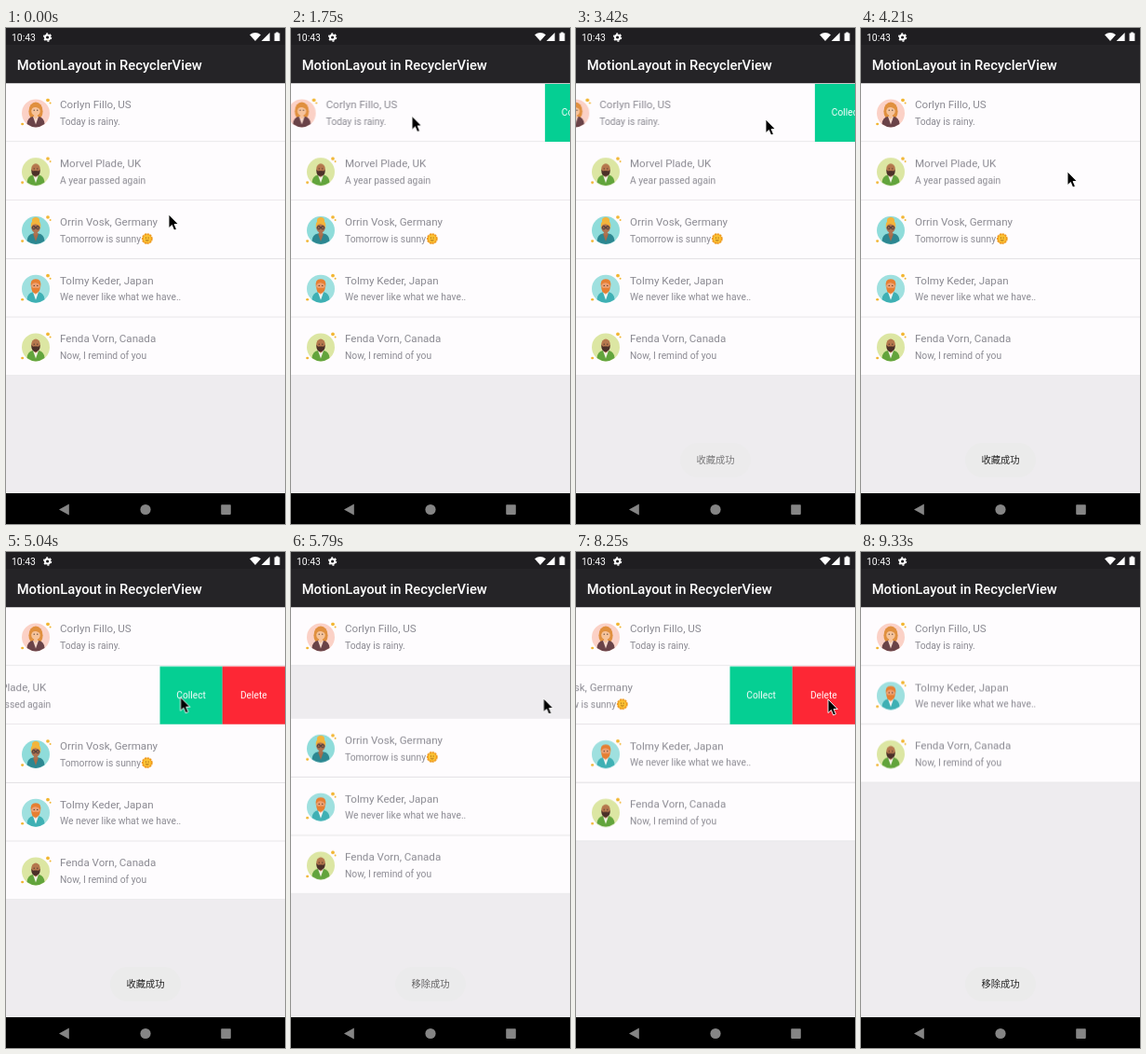
An HTML page that plays this animation: 300x532 px, repeating every 9.37 s.

```html
<!DOCTYPE html>
<html lang="en">
<head>
<meta charset="utf-8">
<title>Swipe list</title>
<style>
  html, body { margin: 0; width: 100%; height: 100%; overflow: hidden; background: #eeecef; }
  svg { display: block; width: 300px; height: 532px; font-family: Roboto, "Noto Sans", sans-serif; }
  .name { font-size: 11.6px; fill: #8b8a92; }
  .note { font-size: 10.3px; fill: #8b8a92; }
  .label { font-size: 10.2px; fill: #fff; text-anchor: middle; }
  .toast text { font: 10.25px "Noto Sans CJK SC", "Noto Sans CJK", sans-serif; fill: #222; text-anchor: middle; }
</style>
</head>
<body>
<svg viewBox="0 0 300 532">
  <rect width="300" height="532" fill="#eeecef"/>
  <g id="list"></g>
  <g id="toasts"></g>

  <rect width="300" height="59.2" fill="#252427"/>
  <rect width="300" height="18" fill="#1f1e21"/>
  <text x="6" y="13.6" font-size="10.4" fill="#fff">10:43</text>
  <g fill="none" stroke="#fff">
    <circle cx="44.6" cy="10" r="2.6" stroke-width="2"/>
    <circle cx="44.6" cy="10" r="4" stroke-width="1.3" stroke-dasharray="2.1"/>
  </g>
  <g fill="#fff">
    <path d="M262 7.2Q268 2.6 274 7.2L268 14Z"/>
    <path d="M283.6 5V14H274.6Z"/>
    <path d="M288.6 5.6H290.2V4.5H292.8V5.6H294.4V14H288.6Z"/>
  </g>
  <text x="11.7" y="45" font-size="14.75" font-weight="500" fill="#fff">MotionLayout in RecyclerView</text>

  <rect y="499" width="300" height="33" fill="#000"/>
  <g fill="#858585">
    <path d="M57 516.5L67.8 510.6V522.4Z"/>
    <circle cx="150" cy="516.5" r="5.6"/>
    <rect x="231.2" y="511.3" width="10.6" height="10.6" rx=".8"/>
  </g>

  <path id="cursor" d="M0 0V14.6L3.4 11.5L5.7 17L8.4 15.8L6.1 10.5H10.3Z" fill="#000" stroke="#fff" stroke-width=".9"/>
</svg>

<script>
const LOOP = 9370;
const TOP = 59.4, PITCH = 62.75;
const SWIPE = 102, BUTTONS = 134.5;
const DRAG = 280;
const SINE = 'cubic-bezier(.37,0,.63,1)';
const STANDARD = 'cubic-bezier(.4,0,.2,1)';

const $ = id => document.getElementById(id);
const oval = (x, y, rx, ry, fill, more = '') =>
  `<ellipse cx="${x}" cy="${y}" rx="${rx}" ry="${ry}" fill="${fill}" ${more}/>`;
const shape = (d, fill) => `<path d="${d}" fill="${fill}"/>`;
const fringe = fill => shape('M-5.2-2Q-6.5-10.4 0-10.4T5.2-2Q4-6 0-6.4T-5.2-2Z', fill);

// Parts drawn behind and in front of the shared head and shoulders.
const people = [
  { name: 'Corlyn Fillo, US', note: 'Today is rainy.',
    bg: '#fbd1c6', skin: '#f6c39b', top: '#6a4348', shirt: '#f6d9cc',
    back: oval(0, -2, 7.6, 10, '#e0903f'), front: fringe('#e0903f') },
  { name: 'Morvel Plade, UK', note: 'A year passed again', beard: '#4b3028',
    bg: '#dce6a3', skin: '#b5774d', top: '#62a43c', shirt: '#f4f2e6' },
  { name: 'Orrin Vosk, Germany', note: 'Tomorrow is sunny', sunny: true,
    bg: '#8fdcda', skin: '#b07350', top: '#2c8791', shirt: '#a96d4a',
    back: oval(0, -10.5, 4, 3.6, '#f3b53c'),
    front: fringe('#f3b53c') + [-2.1, 2.1].map(x =>
      oval(x, -2.8, 1.7, 1.7, 'none', 'stroke="#343039" stroke-width=".8"')).join('') },
  { name: 'Tolmy Keder, Japan', note: 'We never like what we have..', beard: '#e67f32',
    bg: '#9fe0df', skin: '#eda173', top: '#3fb0b4', shirt: '#f1f4f2', front: fringe('#e67f32') },
  { name: 'Fenda Vorn, Canada', note: 'Now, I remind of you', beard: '#4b3028',
    bg: '#dce6a3', skin: '#b5774d', top: '#62a43c', shirt: '#f4f2e6' }
];

const avatar = ({ bg, skin, top, shirt, beard, back = '', front = '' }) => `
  <g transform="translate(32 32)">
    ${oval(0, 0, 15, 15, bg)}${back}
    ${shape('M-9.5 11.6Q-9 4.5-3 3.6H3Q9 4.5 9.5 11.6Q0 18.4-9.5 11.6Z', top)}
    ${shape('M-3 3.6H3L0 12Z', shirt)}
    ${oval(0, 3, 1.9, 2.8, skin)}${oval(0, -3, 4.8, 5.8, skin)}
    ${beard ? shape('M-4.7-2.6Q-3 0-1.8-.9H1.8Q3 0 4.7-2.6Q5 4.6 0 4.8T-4.7-2.6Z', beard) : ''}
    ${front}${oval(-1.8, -3.2, .6, .6, '#3a2a28')}${oval(1.8, -3.2, .6, .6, '#3a2a28')}
    ${oval(13, -14, 1.9, 1.8, '#f2b632')}${oval(15.6, -11, 1, 1, '#f2b632')}
    ${oval(-14.4, 11.6, 1.5, 1.3, '#f2b632')}
  </g>`;

const sun = `<g transform="translate(151.8 41.1)">
  ${oval(0, 0, 4.9, 4.9, '#f5a11d', 'stroke="#f09a1a" stroke-width="2" stroke-dasharray="2.2 .6"')}
  ${oval(0, 0, 4, 4, '#fcc435')}
  <path d="M-1.3-1.6V-.3M1.3-1.6V-.3M-1.6 1.4Q0 2.6 1.6 1.4" fill="none" stroke="#8a4d12" stroke-width=".8"/>
</g>`;

const button = (x, fill, text) =>
  `<rect x="${x}" y=".6" width="67.3" height="${PITCH - .6}" fill="${fill}"/>
   <text class="label" x="${x + 33.6}" y="35.1">${text}</text>`;

$('list').innerHTML = people.map((p, i) => `
  <g transform="translate(0 ${TOP + i * PITCH})"><g id="row${i}">
    <rect width="300" height="${PITCH}" fill="#dfdee1"/>
    <rect width="300" height="62" fill="#fefcfe"/>
    <g id="face${i}">
      ${avatar(p)}
      <text class="name" x="58" y="27">${p.name}</text>
      <text class="note" x="58" y="44.6">${p.note}</text>${p.sunny ? sun : ''}
    </g>
    <g id="buttons${i}" style="transform:translate(${BUTTONS}px,0)">
      ${button(165.5, '#05cf93', 'Collect')}${button(232.7, '#fd2735', 'Delete')}
    </g>
  </g></g>`).join('');

const begin = document.timeline.currentTime || 0;

// Each step is [ms, value, easing to the next step].
function track(id, prop, steps, css = v => v) {
  const inside = steps.filter(([t]) => t > 0 && t < LOOP);
  const all = [[0, steps[0][1]], ...inside, [LOOP, inside[inside.length - 1][1]]];
  const frames = all.map(([t, v, easing = 'linear']) => ({ offset: t / LOOP, [prop]: css(v), easing }));
  $(id).animate(frames, { duration: LOOP, iterations: Infinity }).startTime = begin;
}

const move = ([x, y]) => `translate(${x}px, ${y}px)`;

let hand = [175, 200];
const path = [[0, hand]];
const lifts = people.map(() => []);

function glide(t, ms, x, y, easing = SINE) {
  path.push([t, hand, easing], [t + ms, hand = [x, y]]);
}

// The buttons follow the hand; the row content moves a little less.
function swipe(i, t, closing = []) {
  glide(t, DRAG, hand[0] - BUTTONS, hand[1], 'linear');
  const steps = [[t, 0], [t + DRAG, 1], ...closing];
  track('face' + i, 'transform', steps, p => move([-SWIPE * p, 0]));
  track('buttons' + i, 'transform', steps, p => move([BUTTONS * (1 - p), 0]));
}

function toast(text, t) {
  const id = 'toast' + t;
  $('toasts').insertAdjacentHTML('beforeend', `<g class="toast" id="${id}">
    <rect x="112" y="445" width="76" height="37" rx="18.5" fill="#ebebeb"/>
    <text x="150" y="467.4">${text}</text></g>`);
  track(id, 'opacity', [[t, 0], [t + 280, 1], [t + 2000, 1], [t + 2220, 0]]);
}

// A removed row fades first, then the rows below close the gap.
function remove(i, t) {
  track('row' + i, 'opacity', [[t, 1], [t + 120, 0]]);
  for (const steps of lifts.slice(i + 1)) {
    const y = -PITCH * steps.length / 2;
    steps.push([t + 120, [0, y], SINE], [t + 370, [0, y - PITCH]]);
  }
  toast('移除成功', t - 20);
}

glide(60, 480, 196, 130);
glide(710, 560, 230, 95);
glide(1270, 425, 157, 94.5);
swipe(0, 1695, [[3247, 1, STANDARD], [3647, 0]]);
glide(2400, 680, 204, 98);
toast('收藏成功', 3260);
glide(3520, 660, 222, 154);
swipe(1, 4220);
glide(4640, 760, 271.5, 157);
remove(1, 5620);
glide(6580, 110, 290, 157.5);
swipe(2, 6690);
glide(7300, 850, 271, 158);
remove(2, 8320);
glide(8620, 600, 306, 170);

track('cursor', 'transform', path, move);
lifts.forEach((steps, i) => steps.length && track('row' + i, 'transform', steps, move));
</script>
</body>
</html>
```
